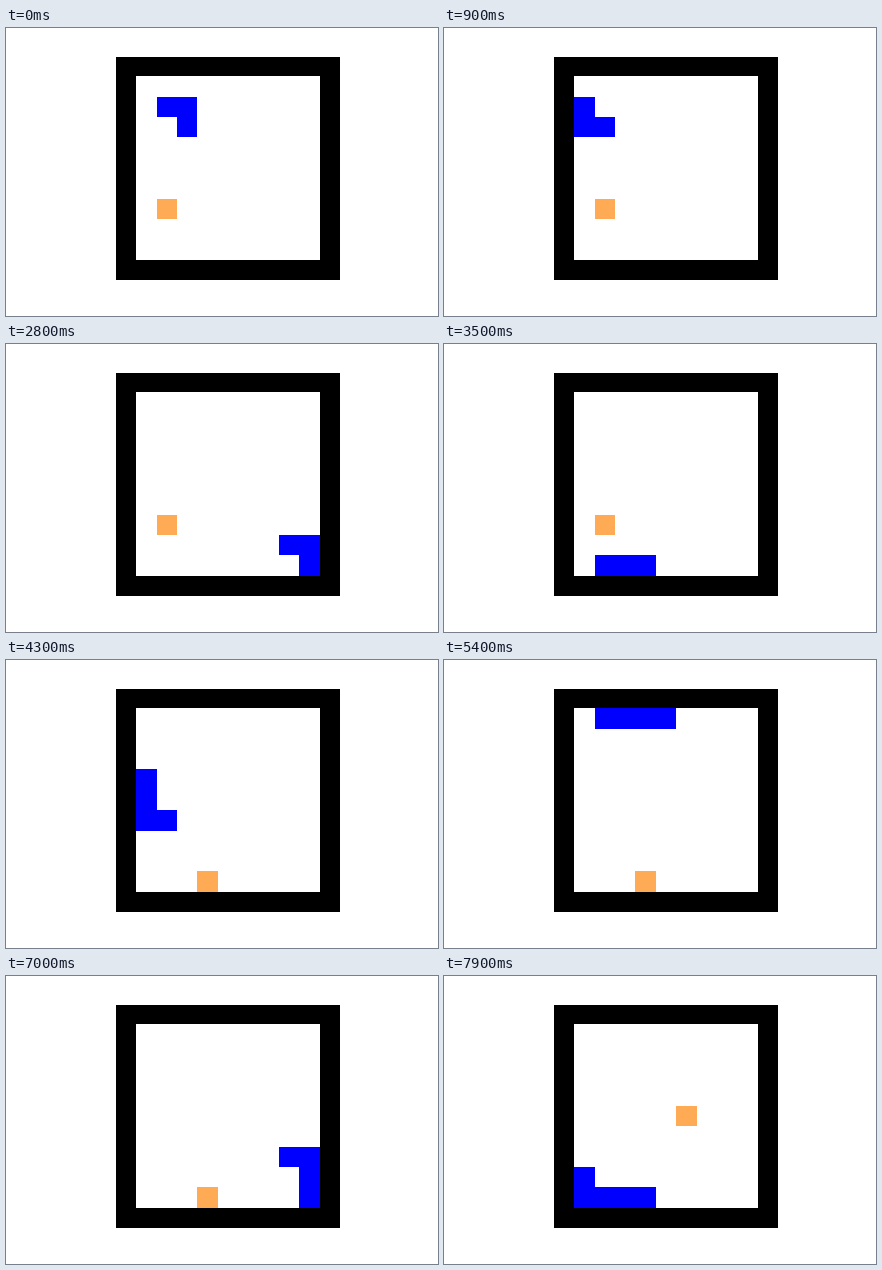
An HTML page with a canvas that plays this animation: 432 by 288 pixels, repeating every 8 s.

```html
<!DOCTYPE html>
<html lang="en">
<head>
<meta charset="utf-8">
<title>Snake</title>
<style>
  html, body { margin: 0; width: 100%; height: 100%; overflow: hidden; background: #fff; }
  canvas { display: block; }
</style>
</head>
<body>
<canvas id="stage" width="432" height="288"></canvas>
<script>
const ctx = document.getElementById('stage').getContext('2d');
const STEP = 100, LOOP = 8000, CELL = 20.36;
const edgeX = c => Math.round(130.4 + c * CELL);
const edgeY = r => Math.round(48.4 + r * CELL);

// Head route as direction + distance, beginning at the tail of the first pose.
const ROUTE = 'R1 D3 L2 U1 R1 U1 L1 U2 R8 D6 L1 D1 R1 D1 L8 U2 R1 U1 L1 U3 ' +
  'R2 U1 L2 U1 R8 D2 L1 D1 R1 D2 L1 D1 R1 D2 L8 U1';
const DIRS = { R: [1, 0], L: [-1, 0], U: [0, -1], D: [0, 1] };
const FOODS = [[1, 6], [3, 8], [5, 4]];
const START_LENGTH = 3;

const path = [[1, 1]];
for (const leg of ROUTE.split(' ')) {
  const [dx, dy] = DIRS[leg[0]];
  for (let n = +leg[1]; n > 0; n--) {
    const [x, y] = path[path.length - 1];
    path.push([x + dx, y + dy]);
  }
}

// Number of foods eaten once the head reaches each point of the path.
let eaten = 0;
const score = path.map(([x, y]) => {
  const [fx, fy] = FOODS[eaten];
  if (x === fx && y === fy) eaten++;
  return eaten;
});

function fillCell([c, r], color) {
  const x = edgeX(c), y = edgeY(r);
  ctx.fillStyle = color;
  ctx.fillRect(x, y, edgeX(c + 1) - x, edgeY(r + 1) - y);
}

function draw(time) {
  const head = Math.floor((time % LOOP) / STEP) + START_LENGTH - 1;
  const length = START_LENGTH + score[head];

  ctx.fillStyle = '#fff';
  ctx.fillRect(0, 0, 432, 288);
  ctx.fillStyle = '#000';
  ctx.fillRect(110, 29, 224, 223);
  ctx.fillStyle = '#fff';
  ctx.fillRect(130, 48, 184, 184);

  fillCell(FOODS[score[head]], '#ffaa55');
  for (const cell of path.slice(head - length + 1, head + 1)) fillCell(cell, '#0000ff');
}

let begin = null;
function tick(now) {
  if (begin === null) begin = now;
  draw(now - begin);
  requestAnimationFrame(tick);
}
draw(0);
requestAnimationFrame(tick);
</script>
</body>
</html>
```
